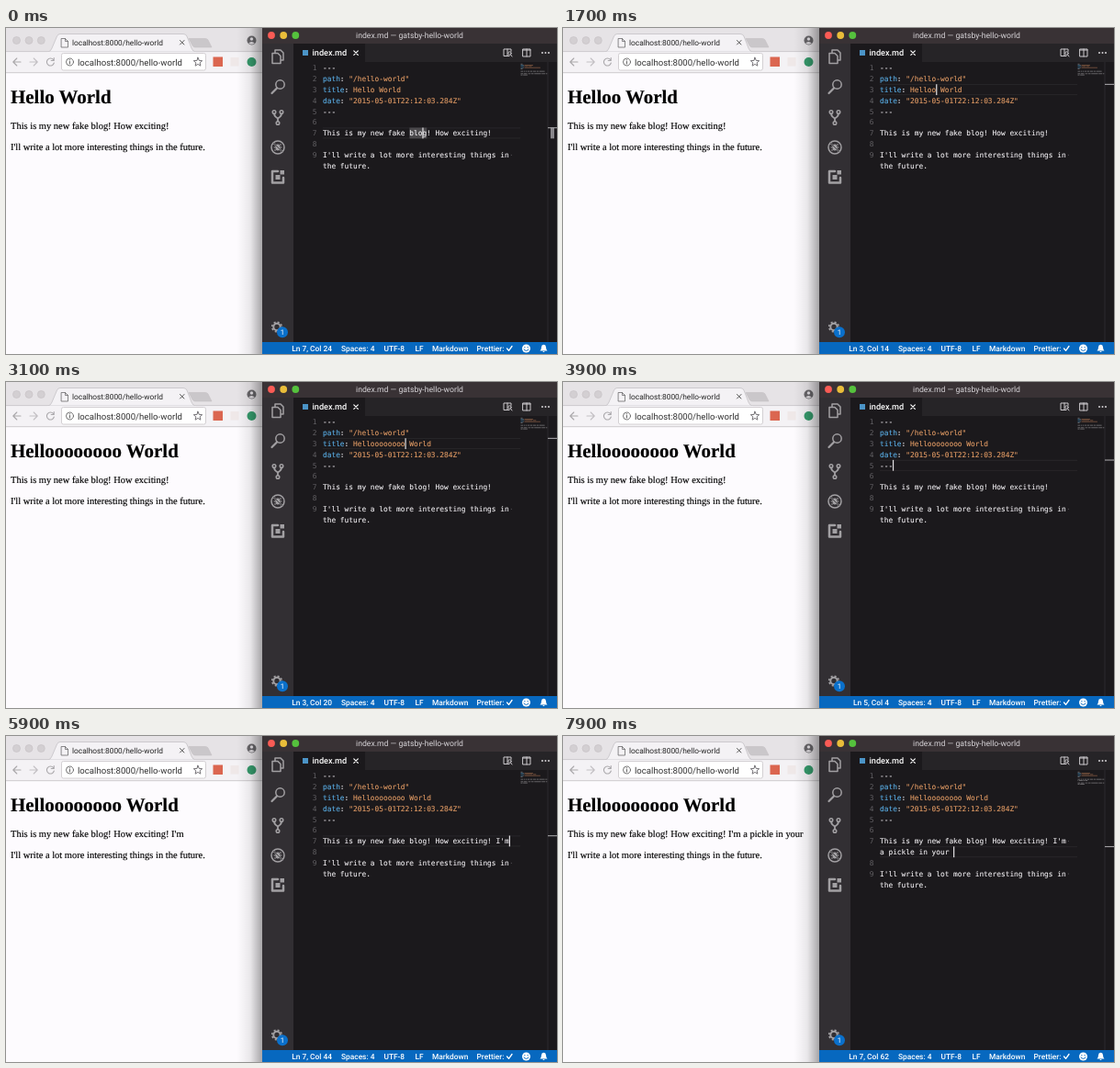
An HTML page for the animation above (8 s loop, 600 by 355 pixels).

```html
<!DOCTYPE html>
<html lang="en">
<head>
<meta charset="utf-8">
<title>Live editing</title>
<style>
html, body { margin: 0; width: 100%; height: 100%; overflow: hidden; background: #1b191c; }
svg { display: block; width: 600px; height: 355px; }
text { white-space: pre; text-rendering: geometricPrecision; }
.ui { font-family: Roboto, "Open Sans", sans-serif; }
.page { font: 10.47px "Liberation Serif", "Times New Roman", serif; fill: #000; stroke: #000; stroke-width: .15; }
.code { font: 7.84px "DejaVu Sans Mono", monospace; fill: #f0eef1; }
.code text { stroke: #f0eef1; stroke-width: .12; }
.code .key { fill: #5aaee6; stroke: #5aaee6; }
.code .str { fill: #e09a64; stroke: #e09a64; }
.code .num { fill: #626064; stroke: none; text-anchor: end; }
.status { font-size: 8.35px; font-weight: 500; fill: #fff; }
.line { fill: none; stroke-linecap: round; stroke-linejoin: round; }
</style>
</head>
<body>
<svg viewBox="0 0 600 355">
  <defs>
    <linearGradient id="shadow">
      <stop offset="0" stop-color="#000" stop-opacity="0"/>
      <stop offset=".5" stop-color="#000" stop-opacity=".08"/>
      <stop offset="1" stop-color="#000" stop-opacity=".36"/>
    </linearGradient>
  </defs>

  <!-- browser -->
  <rect width="280" height="355" fill="#fdfbfe"/>
  <rect width="280" height="26" fill="#e6e3e6"/>
  <g fill="#d3cfd2" stroke="#c4c0c3" stroke-width=".6">
    <circle cx="11.5" cy="13.5" r="4"/><circle cx="25" cy="13.5" r="4"/><circle cx="38.3" cy="13.5" r="4"/>
    <path d="M199 11.500H217Q219 11.500 220 13L224 21H206Q204 21 203 19Z" fill="#cac7ca"/>
  </g>
  <rect y="25.500" width="280" height="23.500" fill="#f4f2f5"/>
  <path d="M46 26Q49 25 50 22L55.500 9Q56.500 6.500 59 6.500H193Q196 6.500 197 9L202 22Q203 25 206 26Z" fill="#f4f2f5" stroke="#bfbcc0" stroke-width=".7"/>
  <path d="M0 25.600H46M206 25.600H280" stroke="#bfbcc0" stroke-width=".7"/>
  <rect x="45" y="26" width="162" height="2" fill="#f4f2f5"/>
  <path d="M0 48.700H280" stroke="#c4c1c5" stroke-width=".8"/>
  <path d="M60.500 11.500H64.500L67.500 14.500V21H60.500ZM64.500 11.500V14.500H67.500" class="line" stroke="#6d6b6e" stroke-width=".8"/>
  <text class="ui" x="72" y="18.900" font-size="8.340" fill="#222">localhost:8000/hello-world</text>
  <path d="M189.500 13.500L194 18M194 13.500L189.500 18" class="line" stroke="#555" stroke-width="1"/>
  <circle cx="267.500" cy="13.500" r="5" fill="#68666a"/>
  <circle cx="267.500" cy="12" r="1.700" fill="#e3e0e4"/>
  <path d="M264.300 16.500Q267.500 13.500 270.700 16.500Q267.500 19 264.300 16.500" fill="#e3e0e4"/>
  <g class="line" stroke-width="1.100">
    <path d="M16 37H8M11.800 33L7.800 37L11.800 41" stroke="#a9a7aa"/>
    <path d="M26 37H34M30.200 33L34.200 37L30.200 41" stroke="#c2bfc3"/>
    <path d="M51.500 34.500A4 4 0 1 0 52.300 38M52.200 32.500V35.500H49.200" stroke="#a9a7aa"/>
  </g>
  <rect x="60.500" y="27.500" width="157" height="18.500" rx="2" fill="#fff" stroke="#c9c6ca" stroke-width=".8"/>
  <circle cx="69.500" cy="37" r="4" class="line" stroke="#666" stroke-width=".9"/>
  <path d="M69.500 36.500V39M69.500 34.700V35" class="line" stroke="#666" stroke-width="1"/>
  <text class="ui" x="78" y="40.500" font-size="9.600" fill="#333">localhost:8000/hello-world</text>
  <path d="M209 32.200L210.300 35.400L213.700 35.700L211.100 37.900L211.900 41.200L209 39.400L206.100 41.200L206.900 37.900L204.300 35.700L207.700 35.400Z" class="line" stroke="#68666a" stroke-width=".9"/>
  <rect x="225.500" y="31.500" width="10.500" height="10.500" fill="#db6650"/>
  <rect x="244.500" y="32" width="9" height="9.500" fill="#efe8e8"/>
  <circle cx="267.500" cy="37" r="5" fill="#369a6c"/>
  <g class="page">
    <text id="heading" x="5" y="82" font-size="20.940" font-weight="700"></text>
    <text id="intro" x="5" y="110.400"></text>
    <text x="5" y="133">I'll write a lot more interesting things in the future.</text>
  </g>
  <rect x="252" width="28" height="355" fill="url(#shadow)"/>

  <!-- editor window -->
  <rect x="279" width="321" height="355" fill="#1b191c"/>
  <rect x="279" width="321" height="17" fill="#393235"/>
  <circle cx="289" cy="8" r="3.900" fill="#fb5b55"/>
  <circle cx="302.200" cy="8" r="3.900" fill="#e9bd3a"/>
  <circle cx="315.300" cy="8" r="3.900" fill="#55c13d"/>
  <text class="ui" x="439.500" y="10.600" font-size="8.670" text-anchor="middle" fill="#d8d5d9">index.md — gatsby-hello-world</text>
  <rect x="279" y="17" width="34" height="325" fill="#322f33"/>
  <rect x="313" y="17" width="287" height="20" fill="#262427"/>
  <rect x="313" y="17" width="78" height="20" fill="#1b191c"/>
  <path d="M590 37V342" stroke="#2d2a2f" stroke-width="1"/>
  <rect x="323" y="24" width="6" height="6" fill="#4b94c7"/>
  <text class="ui" x="333.500" y="30.200" font-size="9.150" font-weight="500" fill="#fff">index.md</text>
  <path d="M378.800 24.800L383.300 29.300M383.300 24.800L378.800 29.300" class="line" stroke="#fff" stroke-width="1.200"/>
  <g class="line" stroke="#cbc8cc" stroke-width="1">
    <path d="M548 30.500H542V23H550V25.500M546 23V30.500"/><circle cx="548.500" cy="27.500" r="1.700"/><path d="M549.500 29L551 31"/>
    <path d="M563 23H571V31H563ZM567 23V31M563 24H571"/>
  </g>
  <g fill="#d5d2d6"><circle cx="584" cy="27" r="1"/><circle cx="587.500" cy="27" r="1"/><circle cx="591" cy="27" r="1"/></g>

  <g class="line" stroke="#a2a0a3" stroke-width="1.500">
    <path d="M293 27V24H299L302 27V35H299M290 27.500H296L299 30.500V38.500H290Z"/>
    <circle cx="298.500" cy="61.500" r="4.700"/><path d="M295 65.500L289.500 71" stroke-width="2.200"/>
    <circle cx="292" cy="91.500" r="1.800"/><circle cx="300" cy="91.500" r="1.800"/><circle cx="296" cy="103.500" r="1.800"/>
    <path d="M292 93.500Q292 96 296 98.500Q300 96 300 93.500M296 98.500V101.500" stroke-width="1.800"/>
    <circle cx="296" cy="130" r="7"/><path d="M291.200 125.200L300.800 134.800"/>
    <path d="M293.500 130H292M300 130H298.500M293.500 133H292.500M298.500 127H299.500" stroke-width="1"/>
    <path d="M296 156H290V168.500H302V163" stroke-width="2.500"/>
    <circle cx="295" cy="325.500" r="3.700" stroke-width="2"/>
    <circle cx="295" cy="325.500" r="5.300" stroke-width="1.600" stroke-dasharray="2.080 2.083" style="stroke-linecap:butt"/>
  </g>
  <ellipse cx="296" cy="130" rx="2.500" ry="3.500" fill="#a2a0a3"/>
  <path d="M291.200 125.200L300.800 134.800" stroke="#322f33" stroke-width=".8"/>
  <rect x="293.500" y="160" width="5" height="5" fill="#a2a0a3"/>
  <rect x="298.500" y="155" width="4.500" height="4.500" fill="#a2a0a3"/>
  <circle cx="301" cy="331.300" r="6" fill="#0a70cb"/>
  <text class="ui" x="301" y="334.200" font-size="7.800" text-anchor="middle" fill="#fff">1</text>

  <g id="doc" class="code"></g>

  <rect x="279" y="342" width="321" height="13" fill="#0768bf"/>
  <g class="ui status">
    <text id="position" x="355" y="352" text-anchor="end"></text>
    <text x="365" y="352">Spaces: 4</text>
    <text x="411.500" y="352">UTF-8</text>
    <text x="445.500" y="352">LF</text>
    <text x="464" y="352">Markdown</text>
    <text x="512.500" y="352">Prettier:</text>
  </g>
  <path d="M545.500 349L547.500 351.300L551 346.500" class="line" stroke="#fff" stroke-width="1.300"/>
  <circle cx="566.500" cy="349" r="4.500" fill="#fff"/>
  <path d="M564.900 347.500V348M568.100 347.500V348M564 350Q566.500 353 569 350" class="line" stroke="#0768bf" stroke-width="1"/>
  <path d="M581.500 351.500Q583 350 583 347.500Q583 345 585.500 344.800Q588 345 588 347.500Q588 350 589.500 351.500ZM584.300 352H586.700Q585.500 354 584.300 352" fill="#fff"/>
</svg>
<script>
const LOOP = 8000, LEFT = 345, CHAR = 4.72, ROW = 11.82, TOP = 37.6;
const INTRO = "This is my new fake blog! How exciting!";
const ADDED = " I'm a pickle in your ";
const WRAP = 5; // added characters that stay on the first row
const el = id => document.getElementById(id);

// Caret moves: time, line, column
const moves = [[0, 7, 24], [300, 3, 13]];
const letterTimes = [1700, 2000, 2250, 2500, 2650, 2850, 3000];
letterTimes.forEach((t, i) => moves.push([t, 3, 14 + i]));
moves.push([3720, 4, 21], [3860, 5, 4], [4050, 6, 1], [4200, 7, 21], [4400, 7, 40]);
[...ADDED].forEach((_, i) => {
  const k = i + 1;
  moves.push([5320 + 125 * k - 0.4 * k * k, 7, 40 + k]);
});

const rowTop = row => TOP + ROW * row;
const rect = (x, y, w, h, fill) =>
  `<rect x="${x}" y="${y}" width="${w}" height="${h}" fill="${fill}"/>`;

function buildRows(title, typed) {
  const wrapped = typed.length > WRAP;
  const field = (n, key, value) => ({ n, parts: [["key", key], ["", ": "], ["str", value]] });
  const plain = (n, text) => ({ n, parts: [["", text]] });
  return [
    plain(1, "---"),
    field(2, "path", '"/hello-world"'),
    field(3, "title", title),
    field(4, "date", '"2015-05-01T22:12:03.284Z"'),
    plain(5, "---"),
    plain(6, ""),
    plain(7, INTRO + typed.slice(0, WRAP)),
    ...(wrapped ? [plain("", typed.slice(WRAP))] : []),
    plain(8, ""),
    plain(9, "I'll write a lot more interesting things in "),
    plain("", "the future.")
  ];
}

function drawRow({ n, parts }, row) {
  const y = rowTop(row) + 8.7;
  const spans = parts.map(([kind, text]) => `<tspan class="${kind}">${text}</tspan>`).join("");
  const length = parts.reduce((sum, part) => sum + part[1].length, 0);
  const space = length === 44
    ? `<circle cx="${LEFT + 43.5 * CHAR}" cy="${y - 2.6}" r=".5" fill="#68666a"/>` : "";
  return `<text class="num" x="338.500" y="${y}">${n}</text>` +
    `<text x="${LEFT}" y="${y}">${spans}</text>` + space;
}

function drawMinimap(rows) {
  const colors = { key: "#365f79", str: "#79533e", "": "#716f72" };
  return rows.map(({ parts }, row) => {
    let col = 0;
    return parts.map(([kind, text]) => {
      const words = [...text.matchAll(/\S+/g)].map(w =>
        rect(560.5 + (col + w.index) * 0.67, 38.8 + row * 1.32, w[0].length * 0.67, 0.85, colors[kind]));
      col += text.length;
      return words.join("");
    }).join("");
  }).join("");
}

let shown = "";
function render(t) {
  const [since, line, col] = moves.filter(m => m[0] <= t).pop();
  const caretOn = (t - since) % 1000 < 500;
  const key = since + "|" + caretOn;
  if (key === shown) return;
  shown = key;

  const title = "Hello" + "o".repeat(letterTimes.filter(x => x <= t).length) + " World";
  const typed = ADDED.slice(0, line === 7 ? Math.max(0, col - 40) : 0);
  const wrapped = typed.length > WRAP;
  const row = wrapped ? 7 : line - 1;
  const caretCol = wrapped ? typed.length - WRAP : col - 1;
  const y = rowTop(row);
  const word = since === 0 ? [20, 4] : since === 300 ? [7, 5] : null;
  const rows = buildRows(title, typed);

  let out = rect(LEFT, y, 215, 0.8, "#2b292c") + rect(LEFT, y + ROW - 0.8, 215, 0.8, "#2b292c");
  if (word) {
    out += rect(LEFT + word[0] * CHAR, y, word[1] * CHAR, ROW, "#4a484b");
    out += rect(593, y, 4, ROW, "#88868a");
  }
  out += rows.map(drawRow).join("") + drawMinimap(rows);
  out += rect(590, y - 0.4, 10, 1.1, "#a3a1a4");
  if (caretOn) out += rect(LEFT + caretCol * CHAR - 0.2, y, 1.2, ROW, "#e4e2e5");

  el("doc").innerHTML = out;
  el("heading").textContent = title;
  el("intro").textContent = (INTRO + typed).trimEnd();
  el("position").textContent = `Ln ${line}, Col ${col}`;
}

const start = performance.now();
function frame() {
  render((performance.now() - start) % LOOP);
  requestAnimationFrame(frame);
}
frame();
</script>
</body>
</html>
```
